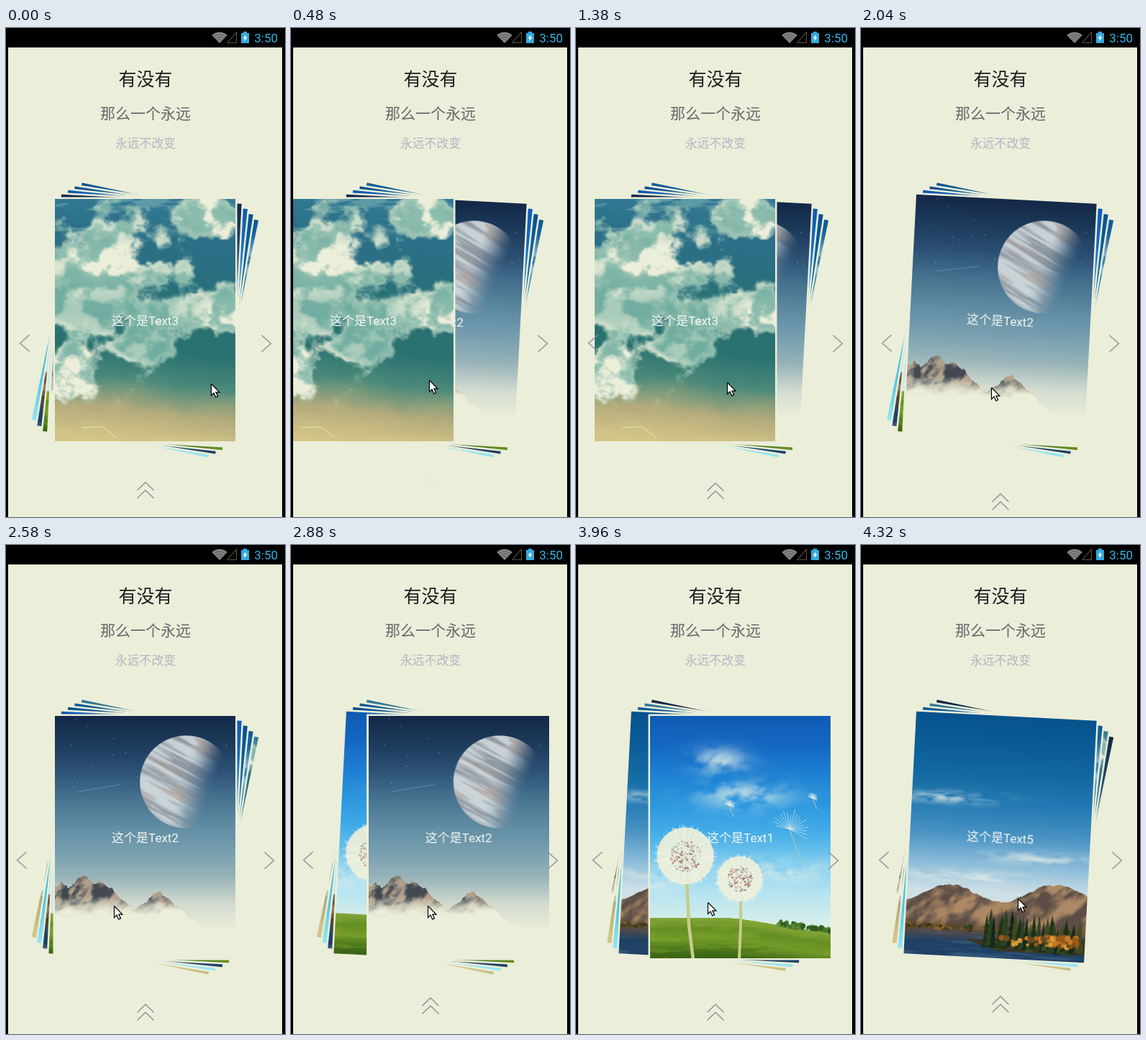
These frames come from a looping animation (388x678 px, 4380 ms). An HTML page with a canvas:

```html
<!DOCTYPE html>
<html lang="zh">
<head>
<meta charset="utf-8">
<title>Card stack</title>
<style>
html, body { margin: 0; width: 100%; height: 100%; overflow: hidden; background: #000; }
canvas { display: block; }
</style>
</head>
<body>
<canvas id="stage" width="388" height="678"></canvas>
<script>
const LOOP = 4380, STEP = 60;
const W = 251, H = 336, CX = 193.5, CY = 405;
const PAPER = '#ebeed9', CREAM = [235, 238, 217];
const FONT = 'Roboto, "Noto Sans CJK SC", "Noto Sans CJK", sans-serif';
const ctx = document.getElementById('stage').getContext('2d');

// ---------- helpers ----------
const clamp = (v, a = 0, b = 1) => Math.min(b, Math.max(a, v));
const smooth = (a, b, v) => { const p = clamp((v - a) / (b - a)); return p * p * (3 - 2 * p); };
const mix = (a, b, p) => a.map((v, i) => v + (b[i] - v) * p);
const hex = s => [1, 3, 5].map(i => parseInt(s.slice(i, i + 2), 16));

// evenly spaced colours over 0..1
function gradient(list) {
  const colors = list.split(' ').map(hex), last = colors.length - 1;
  return p => {
    const v = clamp(p) * last, i = Math.min(last - 1, Math.floor(v));
    return mix(colors[i], colors[i + 1], v - i);
  };
}
function hash(x, y) {
  const s = Math.sin(x * 127.1 + y * 311.7) * 43758.5453;
  return s - Math.floor(s);
}
function noise(x, y) {
  const i = Math.floor(x), j = Math.floor(y);
  const u = smooth(0, 1, x - i), v = smooth(0, 1, y - j);
  const a = hash(i, j) + (hash(i + 1, j) - hash(i, j)) * u;
  const b = hash(i, j + 1) + (hash(i + 1, j + 1) - hash(i, j + 1)) * u;
  return a + (b - a) * v;
}
function fbm(x, y) {
  let sum = 0, amp = 0.53;
  for (let k = 0; k < 4; k++) {
    sum += amp * noise(x, y);
    x = x * 2.03 + 7; y = y * 2.03 + 3; amp /= 2;
  }
  return sum;
}
// strongest of several soft ellipses [x, y, rx, ry]
const lumps = (list, x, y) => list.reduce((m, [a, b, rx, ry]) =>
  Math.max(m, Math.exp(-(((x - a) / rx) ** 2) - ((y - b) / ry) ** 2)), 0);

const rng = seed => () => hash(seed++, 4.7);

function line(g, points, color, width) {
  g.beginPath();
  points.forEach(([x, y]) => g.lineTo(x, y));
  g.strokeStyle = color; g.lineWidth = width;
  g.stroke();
}
function poly(g, points, color) {
  g.beginPath();
  points.forEach(([x, y]) => g.lineTo(x, y));
  g.closePath();
  g.fillStyle = color; g.fill();
}
function disc(g, x, y, r, color) {
  g.beginPath(); g.arc(x, y, r, 0, 7);
  g.fillStyle = color; g.fill();
}
function label(g, str, x, y, size, color, weight = 400, align = 'center') {
  g.font = `${weight} ${size}px ${FONT}`;
  g.textAlign = align;
  g.fillStyle = color;
  g.fillText(str, x, y);
}
function makeCard(name, pixel, details) {
  const c = document.createElement('canvas');
  c.width = W; c.height = H;
  const g = c.getContext('2d'), img = g.createImageData(W, H);
  for (let i = 0; i < W * H; i++) {
    img.data.set([...pixel(i % W, Math.floor(i / W)), 255], i * 4);
  }
  g.putImageData(img, 0, 0);
  if (details) details(g);
  label(g, '这个是' + name, W / 2, 175, 17, '#f4f7f2');
  return c;
}

// ---------- clouds at dusk ----------
function cloudCard() {
  const sky = gradient('#347a95 #2b7088 #2a6f82 #287078 #2a7072 #2a7270 #4c8a7a #b3ab7c #d3c587');
  const puffs = [[60, 118, 125, 92], [200, 150, 75, 38], [215, 22, 55, 32], [12, 240, 58, 54], [122, 200, 42, 38]];
  const bright = [[65, 88, 50, 34], [240, 160, 45, 30], [215, 25, 60, 30], [10, 245, 50, 45]];
  return makeCard('Text3', (x, y) => {
    const n = fbm(x / 30, y / 26) - 0.5;
    const field = lumps(puffs, x, y) + n * 1.1;
    const body = smooth(0.38, 0.6, field);
    const rim = 1 - smooth(0.55, 0.85, field);
    const patch = smooth(0.4, 0.68, fbm(x / 24 + 40, y / 19));
    const lit = clamp(0.45 * patch + 0.25 * rim + 0.6 * lumps(bright, x, y) * (0.4 + patch));
    const base = sky((y + (W / 2 - x) * 0.1 + n * 14) / H);
    const wisp = 0.5 * smooth(0.5, 0.72, fbm(x / 34, y / 7)) * (1 - smooth(35, 55, y));
    return mix(mix(base, [140, 190, 185], wisp), mix([112, 173, 160], CREAM, lit), body);
  }, g => line(g, [[38, 317], [66, 316], [86, 331]], 'rgba(235,238,205,.5)', 1.5));
}

// ---------- planet over snowy peaks ----------
function planetCard() {
  const sky = gradient('#142848 #1d3a5b #2b5073 #45718f #5e8aa1 #769eaf #99b4b9 #d4dcd0 #ebeed9 #ebeed9');
  const peaks = [[10, 46], [40, 58], [62, 50], [145, 35]];
  return makeCard('Text2', (x, y) => {
    let c = sky(y / H);
    const dx = x - 182, dy = y - 91, r = Math.hypot(dx, dy);
    if (r < 65) {
      const v = dy * 0.88 - dx * 0.47, u = dx * 0.88 + dy * 0.47;
      const face = mix([208, 217, 220], [150, 156, 164], smooth(0.38, 0.68, fbm(v / 8 + 5, u / 90)));
      const tan = 0.55 * smooth(0.55, 0.75, noise(v / 6, u / 40));
      const fade = 1 - smooth(-8, 34, dx * 0.8 + dy * 0.3);
      c = mix(c, mix(face, [178, 158, 147], tan), fade * smooth(65, 63.5, r) * 0.95);
    }
    const height = Math.max(...peaks.map(([px, h]) => h - Math.abs(x - px) * 0.9));
    if (y > 276 - height + (fbm(x / 8, 2) - 0.5) * 12) {
      const rock = mix([65, 72, 80], [176, 160, 140], smooth(0.35, 0.65, fbm((x + y * 0.7) / 13, (y - x * 0.3) / 20)));
      c = mix(rock, CREAM, smooth(246, 276, y + (fbm(x / 16, y / 10) - 0.5) * 18));
    }
    return c;
  }, g => {
    const rand = rng(11);
    for (let i = 0; i < 14; i++) disc(g, rand() * W, rand() * 100, 0.6, 'rgba(225,235,240,.65)');
    line(g, [[32, 105], [92, 95]], 'rgba(170,195,210,.35)', 1);
  });
}

// ---------- dandelions ----------
function dandelion(g, x, y, r) {
  const rand = rng(x);
  const ray = (a, from, to) => line(g, [[x + Math.cos(a) * from, y + Math.sin(a) * from],
    [x + Math.cos(a) * to, y + Math.sin(a) * to]], 'rgba(240,242,226,.7)', 0.9);
  disc(g, x, y, r * 0.9, 'rgba(235,238,217,.93)');
  for (let i = 0; i < 130; i++) ray(rand() * 6.283, r * 0.5, r * (0.85 + rand() * 0.17));
  const tints = ['#b87f6c', '#d3a58e', '#aebad2', '#c8b7ae', '#98695f'];
  for (let i = 0; i < 120; i++) {
    const a = rand() * 6.283, q = Math.sqrt(rand()) * r * 0.5;
    disc(g, x + Math.cos(a) * q, y + Math.sin(a) * q, 0.7 + rand() * 0.8, tints[i % 5]);
  }
}
function floater(g, x, y, r) {
  for (let i = 0; i < 18; i++) {
    const a = -2.9 + i * 0.2, q = r * (0.65 + 0.35 * hash(i, r));
    line(g, [[x, y], [x + Math.cos(a) * q, y + Math.sin(a) * q]], 'rgba(238,243,232,.75)', 0.8);
  }
  line(g, [[x, y], [x + r * 0.35, y + r], [x + r * 0.75, y + r * 1.85]], '#b9cbb8', 1);
}
function meadowCard() {
  const sky = gradient('#0f5ab4 #1468c2 #1e80d2 #2b97df #46aee7 #7dcbef #b4e3f1 #d5eee9');
  const grass = gradient('#86a63a #638f22 #729a28 #46741a #355b12');
  const hill = x => 279 + 20 * smooth(90, 260, x);
  const wisps = [[97, 62, 36, 18], [130, 110, 60, 18], [170, 215, 75, 16], [10, 225, 40, 16]];
  return makeCard('Text1', (x, y) => {
    const depth = y - hill(x);
    if (depth > 0) return mix(grass(depth / 60), [150, 175, 55], 0.3 * smooth(0.45, 0.7, fbm(x / 35, y / 5)));
    const m = lumps(wisps, x, y) * smooth(0.25, 0.7, fbm((x + y) / 26, (y - x * 0.3) / 16));
    return mix(sky(y / 285), [224, 238, 233], m * 0.8);
  }, g => {
    const rand = rng(31);
    for (let i = 0; i < 70; i++) {
      const x = 178 + rand() * 73;
      disc(g, x, hill(x) - rand() * 6, 1.5 + rand() * 2.5, ['#315c20', '#477a2a', '#5f8f38'][i % 3]);
    }
    line(g, [[51, 225], [54, 290], [60, 338]], '#c8cc8a', 4.5);
    line(g, [[126, 250], [126, 290], [124, 338]], '#c8cc8a', 4);
    dandelion(g, 49, 194, 44);
    dandelion(g, 125, 226, 35);
    floater(g, 194, 157, 30);
    floater(g, 110, 124, 9);
    floater(g, 226, 114, 8);
  });
}

// ---------- lake ----------
function lakeCard() {
  const sky = gradient('#07528d #0a5c97 #13699f #2279b3 #4791c2 #86b9d8 #cfe0e5');
  const ridge = x => 252 - x * 0.05 - 12 * Math.cos((x - 58) * 0.0427) + (noise(x / 7, 9) - 0.5) * 3;
  const wisps = [[50, 116, 65, 8], [80, 225, 90, 9], [180, 195, 70, 8]];
  return makeCard('Text5', (x, y) => {
    if (y > 298) {
      const water = mix([87, 73, 67], [31, 65, 101], smooth(298, 318, y));
      return mix(water, [82, 118, 148], 0.4 * smooth(0.5, 0.75, fbm(x / 40, y / 4)));
    }
    if (y > ridge(x)) {
      const slope = mix([91, 77, 70], [172, 137, 100], smooth(0.3, 0.7, fbm((x + y * 0.8) / 17, (y - x * 0.3) / 24)));
      return mix(slope, [88, 67, 38], smooth(284, 297, y) * 0.7);
    }
    const m = lumps(wisps, x, y) * smooth(0.25, 0.65, fbm(x / 26, y / 7));
    return mix(sky(y / 245), [232, 237, 230], m * 0.75);
  }, g => {
    const rand = rng(71);
    for (let i = 0; i < 60; i++) {
      disc(g, rand() * 112, 294 + rand() * 5, 1 + rand() * 2, ['#59451f', '#2f3b20', '#8b622a'][i % 3]);
    }
    poly(g, [[85, 312], [W, 303], [W, 326], [130, 326]], '#3a3523');
    for (let i = 0; i < 24; i++) {
      const x = 111 + i * 5.6 + rand() * 4, top = 262 + i * 0.6 + rand() * 17, half = 5 + rand() * 4;
      for (let k = 0; k < 4; k++) {
        const a = top + k * (318 - top) / 4.6, s = half * (0.45 + k * 0.18);
        poly(g, [[x, a], [x + s, a + 19], [x - s, a + 19]], ['#1d3218', '#2b4121', '#17281a', '#3f4a22'][i % 4]);
      }
    }
    for (let i = 0; i < 80; i++) {
      disc(g, 125 + Math.sqrt(rand()) * 115, 302 + rand() * 14, 1.5 + rand() * 3,
        ['#c27a23', '#9a581c', '#d99a3d', '#6b4a1c'][i % 4]);
    }
  });
}

// ---------- bright water ----------
function waterCard() {
  const tone = gradient('#0d5a94 #156aa4 #1e80b4 #1a9cc4 #18b6d2 #4fc9e4 #98e6f4');
  return makeCard('Text4', (x, y) => {
    const m = lumps([[230, 60, 45, 26]], x, y) * smooth(0.25, 0.6, fbm(x / 20, y / 12));
    return mix(tone(y / H), [225, 238, 236], m * 0.85);
  });
}

const deck = [cloudCard(), planetCard(), meadowCard(), lakeCard(), waterCard()];

// ---------- motion ----------
// each drag: pointer start, travel, and when the stack moves up (none = card springs back)
const drags = [
  { at: 120, until: 480, x: 285, y: 493, dx: -93, dy: -5 },
  { at: 1080, until: 1580, x: 252, y: 480, dx: -70, dy: 18, settle: 2170 },
  { at: 2700, until: 3000, x: 150, y: 500, dx: 66, dy: 0, settle: 3400 },
  { at: 3840, until: 4080, x: 148, y: 500, dx: 70, dy: -10, settle: Infinity }
];
const SETTLE = 300, FLING = 1.2;

const progress = (d, t) => clamp((t - d.at) / (d.until - d.at));

function cardShift(t) {
  const d = drags.filter(e => t >= e.at).pop();
  if (!d || t >= d.settle) return 0;
  const late = Math.max(0, t - d.until);
  if (!d.settle) return d.dx * progress(d, t) * Math.exp(-late / 87);
  return d.dx * progress(d, t) + Math.sign(d.dx) * late * FLING;
}

function pointerAt(t) {
  const i = Math.max(0, drags.filter(e => t >= e.at).length - 1);
  const d = drags[i], next = drags[i + 1], p = progress(d, t);
  const here = [d.x + d.dx * p, d.y + d.dy * p];
  return next ? mix(here, [next.x, next.y], smooth(d.until + 400, next.at - 120, t)) : here;
}

function drawStack(t) {
  const moved = drags.filter(d => t >= d.settle);
  const turn = moved.length ? smooth(0, SETTLE, t - moved[moved.length - 1].settle) : 1;
  const shift = cardShift(t), edge = 2.5;
  for (let i = 4; i >= 0; i--) {
    const angle = Math.min(12, 3 * (i + 1 - turn));
    ctx.save();
    ctx.translate(CX + (i ? 0 : shift), CY);
    ctx.rotate(angle * Math.PI / 180);
    ctx.fillStyle = PAPER;
    ctx.fillRect(-W / 2 - edge, -H / 2 - edge, W + edge * 2, H + edge * 2);
    ctx.drawImage(deck[(i + moved.length) % 5], -W / 2, -H / 2);
    ctx.restore();
  }
}

function drawArrows(t) {
  const ink = '#87909c';
  const d = 8.5 * (1 - Math.cos((t / 375 + 0.18) * 2 * Math.PI));
  const left = Math.round(14 + d) + 0.5;
  for (const [tip, dir, y] of [[left, 1, 437], [388 - left, -1, 437.5]]) {
    line(ctx, [[tip + 13 * dir, y - 11.5], [tip, y], [tip + 13 * dir, y + 11.5]], ink, 1.3);
  }
  const p = ((t - 636 + 1400) % 1400) / 1400;
  const y = Math.round(645 - 14 * (1 - Math.cos(Math.PI * p))) + 1;
  ctx.globalAlpha = 1 - smooth(0.65, 0.92, p);
  for (const k of [0, 11]) line(ctx, [[182.5, y + k + 11], [194, y + k], [205.5, y + k + 11]], ink, 1.3);
  ctx.globalAlpha = 1;
}

function drawPointer(t) {
  const [x, y] = pointerAt(t);
  ctx.save();
  ctx.translate(Math.round(x) + 0.5, Math.round(y) + 0.5);
  const shape = [[0, 0], [0, 16], [3.6, 12.6], [6.2, 18.4], [9, 17.2], [6.4, 11.6], [11.4, 11.6], [0, 0]];
  poly(ctx, shape, '#fff');
  line(ctx, shape, '#000', 1.2);
  ctx.restore();
}

function drawStatus() {
  // wifi fan
  for (let r = 15.5; r > 3; r -= 3.5) {
    ctx.beginPath();
    ctx.moveTo(297, 21);
    ctx.arc(297, 21, r, -Math.PI * 0.75, -Math.PI * 0.25);
    ctx.closePath();
    ctx.fillStyle = '#858585'; ctx.fill();
    ctx.strokeStyle = 'rgba(0,0,0,.4)'; ctx.lineWidth = 0.8; ctx.stroke();
  }
  line(ctx, [[307.5, 20.5], [320.5, 20.5], [320.5, 6], [307.5, 20.5]], '#5b5244', 1.1);
  // battery
  ctx.fillStyle = '#33a9dc';
  ctx.fillRect(327, 7, 11, 14);
  ctx.fillRect(330, 5, 5, 2);
  poly(ctx, [[333.5, 9], [329.5, 14.5], [332, 14.5], [331.3, 18.5], [335.6, 12.8], [333, 12.8]], '#fff');
  label(ctx, '3:50', 378, 19.5, 17, '#33b5e5', 400, 'right');
}

function draw(t) {
  ctx.fillStyle = '#000';
  ctx.fillRect(0, 0, 388, 678);
  ctx.save();
  ctx.beginPath();
  ctx.rect(3, 27, 381, 651);
  ctx.clip();
  ctx.fillStyle = PAPER;
  ctx.fillRect(3, 27, 381, 651);
  label(ctx, '有没有', 194, 79.5, 25, '#1c1e1f');
  label(ctx, '那么一个永远', 194, 126, 21, '#64686b', 300);
  label(ctx, '永远不改变', 194, 166, 16.8, '#b2b4c4', 300);
  drawStack(t);
  drawArrows(t);
  ctx.restore();
  drawStatus();
  drawPointer(t);
}

const start = performance.now();
function tick() {
  const t = (performance.now() - start) % LOOP;
  draw(Math.floor(t / STEP) * STEP);
  requestAnimationFrame(tick);
}
tick();
</script>
</body>
</html>
```
